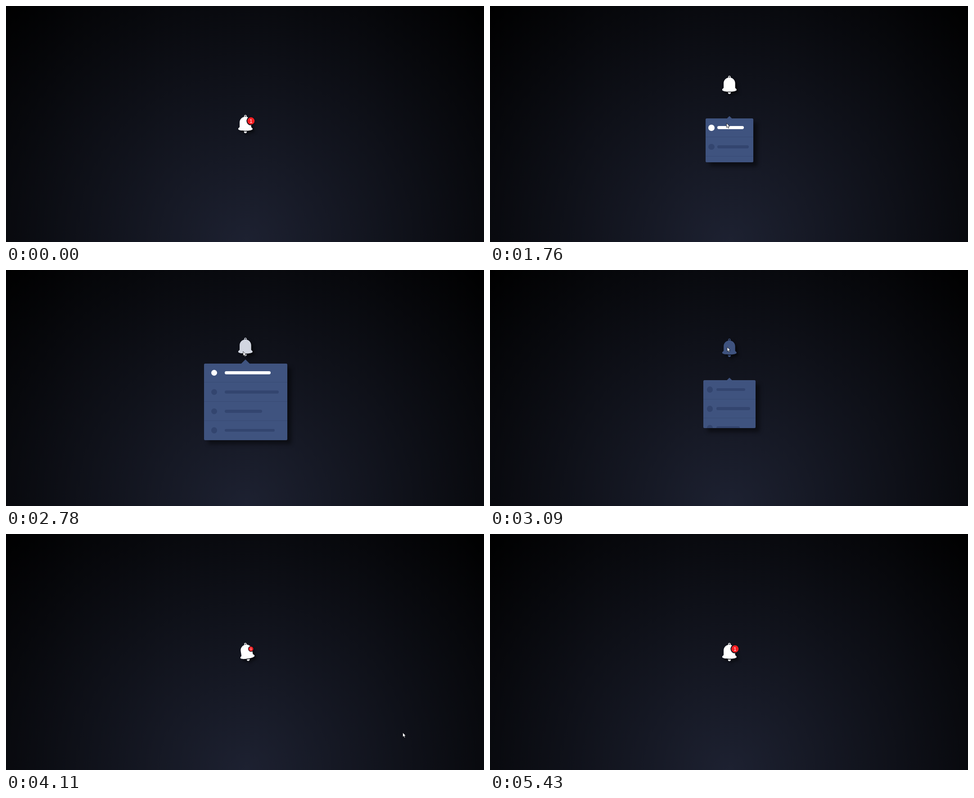
These frames come from a looping animation (1062 px wide and 527 px high, 5660 ms). An HTML page:

```html
<!DOCTYPE html>
<html lang="en">
<head>
<meta charset="utf-8">
<title>Notification bell</title>
<style>
  html, body { margin: 0; width: 100%; height: 100%; overflow: hidden; }
  body { position: relative; background: radial-gradient(circle at bottom, #1d2131, #000); }
  #panel {
    position: absolute; border-radius: 2.5px; background: #3f537f;
    box-shadow: 9px 9px 9px rgba(0, 0, 0, .45);
  }
  #panel::before {
    content: ""; position: absolute; left: 45%; bottom: calc(100% - .5px); width: 10%;
    aspect-ratio: 2 / 1; background: #3f537f; clip-path: polygon(50% 0, 100% 100%, 0 100%);
  }
  #list { position: absolute; inset: 0; overflow: hidden; border-radius: 2.5px; }
  .row { position: relative; height: 42.75px; box-sizing: border-box; border-bottom: 1px solid #384a74; color: #33456f; }
  .row:last-child { border: 0; }
  .row.unread { color: #fff; }
  .row i { position: absolute; background: currentColor; }
  .dot { left: 12.5%; top: 14.6px; width: 13.4px; height: 13.4px; margin-left: -6.7px; border-radius: 50%; }
  .bar { left: 25%; top: 17.8px; height: 6.8px; border-radius: 3.4px; }
  svg { position: absolute; inset: 0; width: 1062px; height: 527px; }
  #bell { filter: drop-shadow(5px 5px 3px rgba(0, 0, 0, .55)); }
  #badge text { font: 11px "Liberation Sans", Arial, sans-serif; text-anchor: middle; fill: #fff; }
</style>
</head>
<body>
<div id="panel"><div id="list"></div></div>
<svg viewBox="0 0 1062 527">
  <g id="mover">
    <g id="bell">
      <g id="body">
        <circle cy="2.9" r="2" fill="none" stroke="currentColor" stroke-width="1.5"/>
        <path fill="currentColor" d="M-12.8 27V17.5C-12.8 10-8 6-3 4.5H3C8 6 12.8 10 12.8 17.5V27C13 28.7 16 29 16 31.6C16 34.6 8 35.7 0 35.7S-16 34.6-16 31.6C-16 29-13 28.7-12.8 27Z"/>
        <path id="clapper" fill="currentColor" d="M-3.3 37.2H3.3Q3 41 0 41T-3.3 37.2Z"/>
      </g>
    </g>
    <g id="badge">
      <circle r="9" fill="#fb1f23" stroke="#10121b" stroke-width="2"/>
      <text y="3.9">1</text>
    </g>
  </g>
  <path id="cursor" fill="#fff" stroke="#0a0b10" stroke-width=".8" d="M0 0V9.8L2.2 7.9L3.7 11.4L5.4 10.7L4 7.3H6.9Z"/>
</svg>
<script>
  const LOOP = 5660;
  const ENTER = 640, OPEN = 1450, CLOSE = 3000, RING = 3900, LEAVE = 5430;
  const WHITE = [255, 255, 255], HOVER = [63, 83, 127], READ = [51, 70, 112];
  const $ = id => document.getElementById(id);

  const smooth = p => p * p * (3 - 2 * p);
  const out = power => p => 1 - (1 - p) ** power;
  const inOutCubic = p => p < .5 ? 4 * p ** 3 : 1 - 4 * (1 - p) ** 3;

  const progress = (t, from, duration) => Math.min(1, Math.max(0, (t - from) / duration));
  const ramp = (t, from, duration, ease = smooth) => ease(progress(t, from, duration));
  const mix = (a, b, p) => a.map((v, i) => v + (b[i] - v) * p);
  const place = (id, transform) => $(id).setAttribute("transform", transform);

  $("list").innerHTML = [55, 65, 45, 60]
    .map(w => `<div class="row"><i class="dot"></i><i class="bar" style="width:${w}%"></i></div>`).join("");
  const firstRow = $("list").firstChild;

  function drawPanel(t) {
    const size = ramp(t, OPEN + 205, 425, out(3)) - ramp(t, CLOSE, 435, out(2));
    const width = 185 * size;
    Object.assign($("panel").style, {
      display: size > .005 ? "block" : "none",
      left: 532 - width / 2 + "px",
      top: 308 - 99.5 * size + "px",
      width: width + "px",
      height: 171 * size + "px"
    });
    firstRow.classList.toggle("unread", t < CLOSE);
  }

  // Three swings that die away.
  function swing(t) {
    const p = progress(t, RING, 880);
    return Math.sin(6 * Math.PI * p) * (1 - p * p);
  }

  function drawBell(t) {
    const lift = 92 * (ramp(t, OPEN, 590, out(4)) - ramp(t, CLOSE, 500, inOutCubic));
    place("mover", `translate(531.9 ${243 - lift})`);
    place("body", `rotate(${10 * swing(t)} 0 3)`);
    place("clapper", `translate(${-8 * swing(t - 60)} 0)`);

    const hover = ramp(t, 1120, 120) - ramp(t, OPEN + 40, 150) + ramp(t, 2740, 130) - ramp(t, 3160, 170);
    const read = (t >= CLOSE) - ramp(t, RING, 150);
    const color = mix(mix(WHITE, READ, read), HOVER, hover);
    $("bell").style.color = `rgb(${color.map(Math.round)})`;

    const pop = .15 * Math.sin(Math.PI * progress(t, RING, 950));
    const badge = 1 - ramp(t, OPEN, 130) + ramp(t, RING, 400) + pop;
    place("badge", `translate(12.4 13.6) scale(${badge})`);
  }

  // Each leg: start time, duration, point reached.
  const legs = [
    [ENTER, 560, [525.5, 261.5]],
    [2440, 430, [527, 172]],
    [3100, 450, [805, 239.5]],
    [3550, 560, [881.5, 443.5]],
    [4730, 580, [1044.5, 491]],
    [5310, 120, [1050, 530]]
  ];

  function drawCursor(t) {
    let point = [1016, 494];
    for (const [from, duration, to] of legs) point = mix(point, to, ramp(t, from, duration));
    const arc = 120 * Math.sin(Math.PI * ramp(t, ENTER, 560));
    place("cursor", `translate(${point[0]} ${point[1] - arc})`);
    $("cursor").style.display = t >= ENTER && t < LEAVE ? "" : "none";
  }

  const start = performance.now();
  function tick() {
    const t = (performance.now() - start) % LOOP;
    drawPanel(t);
    drawBell(t);
    drawCursor(t);
    requestAnimationFrame(tick);
  }
  tick();
</script>
</body>
</html>
```
